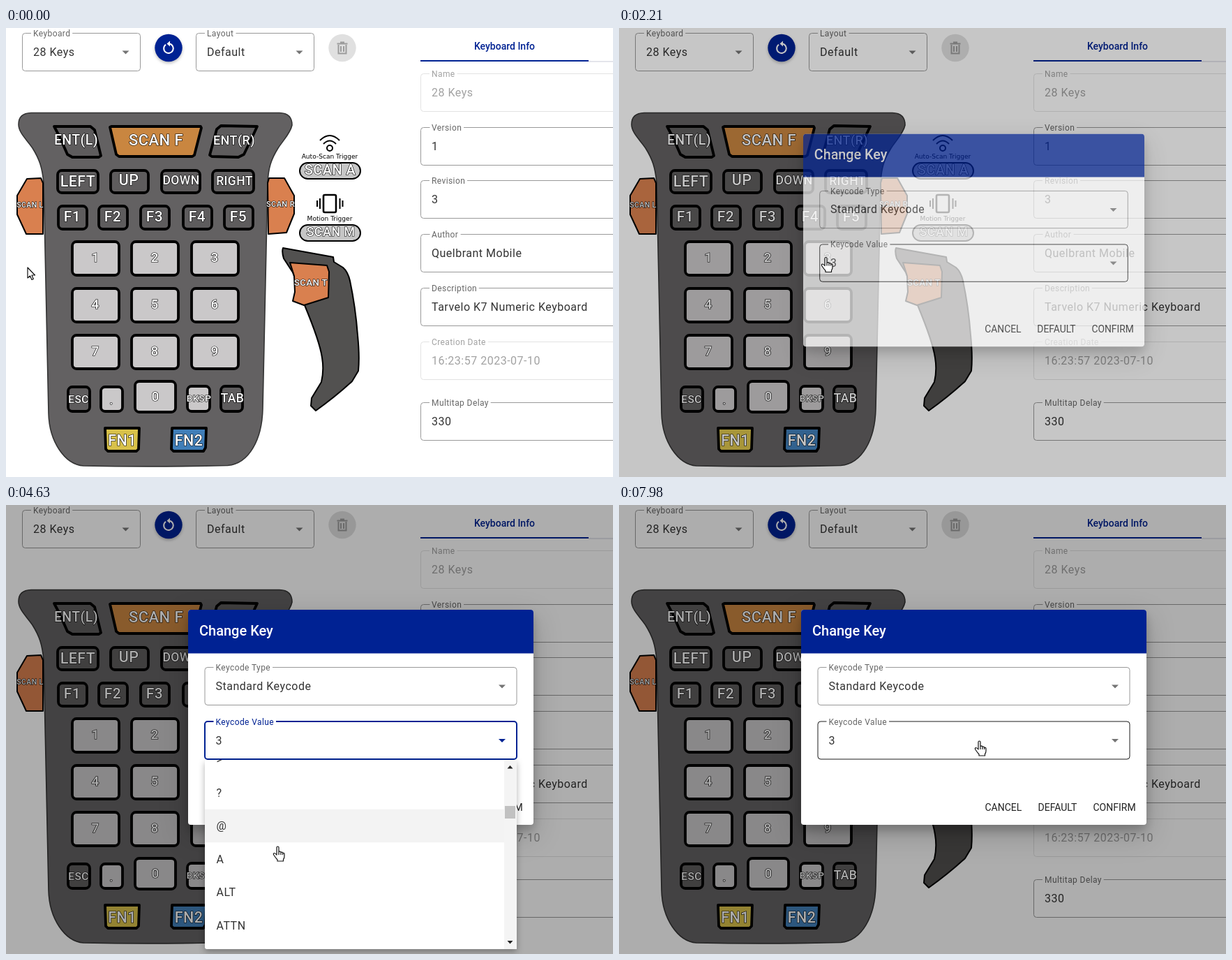
An HTML page that plays this animation: 870 by 643 pixels, repeating every 8000 ms.

```html
<!DOCTYPE html>
<html lang="en">
<head>
<meta charset="utf-8">
<title>Keyboard editor</title>
<style>
  html, body { margin: 0; width: 100%; height: 100%; overflow: hidden; background: #fff; }
  svg { display: block; font-family: Roboto, sans-serif; }
  .key { stroke: #000; stroke-width: 3.8; stroke-linejoin: round; }
  .key.hot { stroke: #fff200; }
  .cap { fill: #fff; stroke: #000; stroke-width: 1.2; paint-order: stroke; text-anchor: middle; font-weight: 500; letter-spacing: .4px; }
  .note { font: 9.07px "DejaVu Sans", sans-serif; text-anchor: middle; }
  .ink { fill: none; stroke: #000; stroke-width: 2; }
  .part { stroke: #000; stroke-width: 2; stroke-linejoin: round; }
  .field rect { fill: none; stroke: #999; }
  .label { font-size: 12px; letter-spacing: .4px; fill: #666; stroke: #fff; stroke-width: 8px; paint-order: stroke; }
  .value { font-size: 16px; letter-spacing: .5px; fill: #333; }
  .caret { fill: #757575; }
  .off rect { stroke: #e2e2e2; }
  .off .label, .off .value { fill: #a2a2a2; }
  .over rect { stroke: #1c1c1c; }
  .focus rect { stroke: #002293; stroke-width: 2; }
  .focus .label, .focus .caret { fill: #002293; }
  .button { font-size: 14px; fill: #222; }
  .tip { font-size: 12px; font-weight: 700; fill: #fff; }
  #dialog { filter: drop-shadow(0 8px 7px rgba(0, 0, 0, .2)) drop-shadow(0 12px 19px rgba(0, 0, 0, .2)); }
  #menu { filter: drop-shadow(0 4px 5px rgba(0, 0, 0, .3)); }
</style>
</head>
<body>
<svg id="stage" width="870" height="643" viewBox="0 0 870 643"></svg>
<script>
const BLUE = '#002293', DARK = '#5e5c5d', LIGHT = '#cac8c9', ORANGE = '#d9804f';
const ROW = 47.5, MENU_TOP = 365, SCROLL = 771, LOOP = 8000;

const cap = (s, x, y, size) =>
  `<text class="cap" x="${x}" y="${y + size * .355}" font-size="${size}">${s}</text>`;
const poly = (points, fill, cls = 'key') => `<polygon class="${cls}" points="${points}" fill="${fill}"/>`;
const key = (x1, y1, x2, y2, fill, id = '') =>
  `<rect class="key" id="${id}" x="${x1 + 2}" y="${y1 + 2}" width="${x2 - x1 - 4}" height="${y2 - y1 - 4}" rx="6" fill="${fill}"/>`;
const caret = (x, y) => `<path class="caret" d="M${x - 5} ${y - 2.5}h10l-5 5z"/>`;
const field = (x, y, w, label, value, cls = '', id = '') =>
  `<g class="field ${cls}" id="${id}"><rect x="${x + .5}" y="${y + .5}" width="${w}" height="54" rx="4"/>
  <text class="label" x="${x + 16}" y="${y + 5}">${label}</text>
  <text class="value" x="${x + 16}" y="${y + 33}">${value}</text>
  ${cls === 'select' ? caret(x + w - 20.5, y + 28) : ''}</g>`;

function toolbar() {
  return field(23, 7, 169, 'Keyboard', '28 Keys', 'select') +
    field(272, 7, 169, 'Layout', 'Default', 'select') +
    `<circle cx="233" cy="28.500" r="19.7" fill="${BLUE}" style="filter:drop-shadow(0 2px 2px #0004)"/>
    <path d="M229 23.7a6.8 6.8 0 1 0 5-1.2" fill="none" stroke="#fff" stroke-width="2"/>
    <path d="M235 18.5v8l-4.5-4z" fill="#fff"/>
    <circle cx="482" cy="28.5" r="19.7" fill="#e0e0e0"/>
    <path d="M476.5 24v12.5h11V24M474.5 22.5h15M479 20.5h6M480 26v8M484 26v8" fill="none" stroke="#9c9c9c" stroke-width="2"/>`;
}

function info() {
  const rows = [
    [65, 'Name', '28 Keys', 'off'], [142, 'Version', '1'], [218, 'Revision', '3'],
    [295, 'Author', 'Quelbrant Mobile'], [372, 'Description', 'Tarvelo K7 Numeric Keyboard'],
    [449, 'Creation Date', '16:23:57 2023-07-10', 'off'], [536, 'Multitap Delay', '330']];
  return `<text x="714.5" y="31" text-anchor="middle" font-size="14" font-weight="500" fill="${BLUE}">Keyboard Info</text>
    <path d="M835 48h35" stroke="#c9cad8"/><path d="M594 47h241" stroke="${BLUE}" stroke-width="2"/>` +
    rows.map(([y, label, value, cls]) => field(594, y, 300, label, value, cls)).join('');
}

function device() {
  let s = `<path d="M36 121.5H392Q410 122 410 139C408 150 398 160 390 172C380 188 376 200 375 222L368 545C367 590 348 624 318 626.500Q215 629 111 627C84 625 62 592 61 552L54 222C52 200 48 188 38 172C30 160 18 150 18 138Q18 122 36 121.5Z" fill="#636162" stroke="#333" stroke-width="1.600"/>`;
  s += poly('30,216 50,215 53,222 53,295 29,295 16,267 16,240', ORANGE, 'part');
  s += poly('377,215 399,215 413,240 413,266 402,293 376,295 375,222', ORANGE, 'part');
  s += poly('69,141 121,141 127,146 136,183 133,185 95,185 88,181 77,156', DARK);
  s += poly('360,141 308,140 302,145 292,182 295,184 333,185 341,181 353,156', DARK);
  s += poly('149,142 151,141 279,141 280,143 270,182 267,184 162,184 158,181', '#c98640');
  for (const [a, b] of [[72, 134], [148, 206], [221, 280], [294, 357]]) s += key(a, 202, b, 238, DARK);
  [73, 131, 191, 252, 311].forEach((x, i) => {
    s += key(x, 253, x + 45, 290, DARK) + cap('F' + (i + 1), x + 22, 269.5, 21);
  });
  for (let i = 0; i < 9; i++) {
    const x = [93, 178, 264][i % 3], y = 304 + 67 * Math.floor(i / 3);
    s += key(x, y, x + 71, y + 52, LIGHT, 'n' + (i + 1)) + cap(i + 1, x + 35, y + 24.5, 19);
  }
  s += key(183, 504, 245, 552, LIGHT) + key(87, 512, 122, 551, DARK) + key(134, 512, 169, 551, LIGHT) +
    key(258, 511, 294, 551, LIGHT) + key(306, 511, 341, 551, DARK) +
    poly('142,573 191,573 190,603 187,606 146,606 143,603', '#d8c14a') +
    poly('238,573 287,573 286,601 283,606 240,606 237,603', '#407eb8');
  s += `<g class="part"><rect x="421" y="193" width="87" height="23" rx="11.5" fill="#c6c6c6"/>
    <rect x="421" y="282" width="87" height="23" rx="11.5" fill="#c6c6c6"/>
    <path d="M397 315L469 328L470 335L483 343Q490 349 493 362Q501 400 504 440Q507 470 505 491L496 506Q472 528 444 548L437 541L438 530L452 507Q456 490 453 472Q450 450 428 397L411 350L398 330Q395 320 397 315Z" fill="#525150"/></g>`;
  s += poly('407,336 460,340 463,349 462,386 427,397 411,391 414,378 413,355', ORANGE, 'part');
  s += `<g class="ink"><path d="M450 161Q464 147 478 161M455 166Q464 157 473 166"/><circle cx="464" cy="172" r="4"/>
    <rect x="455" y="239" width="18" height="25" rx="2" stroke-width="2.6"/>
    <path d="M450 244v15M446 247v9M478.500 244v15M482.500 247v9"/></g>
    <text class="note" x="464" y="187">Auto-Scan Trigger</text><text class="note" x="464" y="276">Motion Trigger</text>`;
  const caps = [
    ['ENT(L)', 100.5, 160.5, 19.5], ['SCAN F', 215, 160.5, 22], ['ENT(R)', 327, 160.5, 18],
    ['LEFT', 103, 219.5, 21.5], ['UP', 176, 217.5, 21.5], ['DOWN', 251, 218, 17.5], ['RIGHT', 327.5, 219, 17.5],
    [0, 214, 527, 19], ['ESC', 104, 531, 15.5], ['.', 151, 533, 18], ['BKSP', 276.5, 530, 13.5], ['TAB', 324.5, 530, 17.5],
    ['FN1', 166.5, 590, 21.5], ['FN2', 262, 590, 21.5], ['SCAN L', 34.5, 253, 10.5], ['SCAN R', 393.5, 252.5, 11],
    ['SCAN T', 437, 364.5, 13.2], ['SCAN A', 464.5, 202.5, 20], ['SCAN M', 465.5, 292, 18]];
  return s + caps.map(c => cap(...c)).join('');
}

function dialog() {
  return `<g id="dialog"><rect x="261" y="150" width="495" height="308" rx="4" fill="#fff"/>
    <path d="M261 212.500V154q0-4 4-4H752q4 0 4 4V212.500z" fill="${BLUE}"/>
    <text x="277" y="187" font-size="20" font-weight="500" fill="#fff">Change Key</text>` +
    field(284.5, 232, 447, 'Keycode Type', 'Standard Keycode', 'select') +
    field(284.5, 309.5, 447, 'Keycode Value', '3', 'select', 'target') +
    `<text class="button" x="524.500" y="437.500">CANCEL</text><text class="button" x="600.500" y="437.500">DEFAULT</text>
    <text class="button" x="679.500" y="437.500">CONFIRM</text></g>`;
}

function menu() {
  const items = [...'./0123456789:;', '&lt;', '=', '&gt;', '?', '@', 'A', 'ALT', 'ATTN', 'B', 'BACK'];
  const rows = items.map((s, i) => `<text class="value" x="16.5" y="${10.5 + i * ROW + 5.5}">${s}</text>`).join('');
  return `<g id="menu"><rect x="285" y="365" width="447" height="271" rx="3" fill="#fff"/>
    <svg x="285" y="365" width="429" height="271"><g id="list">
      <rect id="hover" width="429" height="${ROW}" fill="#f3f3f3"/>${rows}
      <path d="M396 248l5.500 5.500l10-11" fill="none" stroke="${BLUE}" stroke-width="2"/></g></svg>
    <rect x="714" y="365" width="18" height="271" fill="#f4f4f4"/>
    <rect id="thumb" x="715" width="15" height="18" fill="#c1c1c1"/>
    <path d="M718.500 377.500h8l-4-4.500zM718.500 624h8l-4 4.500z" fill="#222"/></g>`;
}

function tooltip() {
  const lines = ['BATTSWAP &amp; PTT keycodes', 'only supported with version 2 of', 'the Advanced Keyboard.'];
  return `<g id="tooltip"><rect x="410" y="357" width="197" height="55" rx="4" fill="#616161" opacity=".9"/>` +
    lines.map((s, i) => `<text class="tip" x="417" y="${373.5 + i * 15.6}">${s}</text>`).join('') + '</g>';
}

const stage = document.getElementById('stage');
stage.innerHTML = toolbar() + info() + device() +
  '<rect id="scrim" width="870" height="643"/>' + dialog() + menu() + tooltip() +
  `<circle id="press" r="13" fill="#e2d800"/>
  <g id="cursor" fill="#fff" stroke="#111" stroke-width="1.200" stroke-linejoin="round">
    <path id="arrow" d="M0 0V15L3.500 12L6 17.500L8.300 16.500L6 11H10.500Z"/>
    <path id="hand" d="M-2 12V1.500Q-2 0-.5 0T1 1.500V7.500Q3.500 6.500 4 8.300Q6.300 7.600 6.700 9.300Q9 9 9 11V14Q9 17 7.500 18.500V21H-1V19Q-3 17-6 12.500Q-7.500 10-5.500 9.500Q-4 9.500-2 12ZM1 7.500V12M4 8.300V12M6.700 9.300V12"/>
  </g>`;

const el = {};
for (const node of stage.querySelectorAll('[id]:not([id=""])')) el[node.id] = node;
const targetValue = el.target.querySelector('.value');
const set = (node, attrs) => { for (const k in attrs) node.setAttribute(k, attrs[k]); };

// Pointer path: time, x, y
const path = [
  [0, 31, 343], [70, 31, 343], [860, 163, 338], [1670, 297, 328.5], [2780, 297, 328.5], [3340, 488, 331],
  [3790, 488, 331], [3980, 440, 430], [4560, 391, 475], [4630, 390, 489], [5040, 384, 497], [5500, 384, 497],
  [5900, 295, 324], [6200, 325, 343], [6400, 325, 343], [6770, 615, 419], [6950, 628, 444], [7600, 628, 444],
  [7980, 517, 338], [LOOP, 517, 338]];
const presses = [2000, 3550, 5350, 7020];

const ramp = (t, start, length) => Math.min(1, Math.max(0, (t - start) / length));
const smooth = p => p * p * (3 - 2 * p);
const within = (t, a, b) => t >= a && t < b;
const scrollAt = t => SCROLL * smooth(ramp(t, 3960, 580));

function cursorAt(t) {
  const i = Math.max(1, path.findIndex(p => p[0] > t));
  const [a, b] = [path[i - 1], path[i]], p = ramp(t, a[0], b[0] - a[0]);
  return [a[1] + (b[1] - a[1]) * p, a[2] + (b[2] - a[2]) * p];
}

function scaled(node, opacity, sx, sy, x, y) {
  set(node, { opacity, transform: `translate(${x} ${y}) scale(${sx} ${sy}) translate(${-x} ${-y})` });
}

function draw(t) {
  const [x, y] = cursorAt(t);
  const open = t >= 2130;

  let onKey = false;
  for (let i = 1; i <= 3; i++) {
    const left = [93, 178, 264][i - 1];
    const hot = !open && within(x, left, left + 71) && within(y, 304, 356);
    el['n' + i].classList.toggle('hot', hot);
    onKey = onKey || hot;
  }

  const shown = ramp(t, 2130, 115);
  set(el.scrim, { opacity: .32 * shown });
  const size = 1 - .2 * (1 - shown) ** 2.3;
  scaled(el.dialog, shown, size, size, 508.5, 304);

  const focus = within(t, 3550, 7040), picked = within(t, 5400, 7040);
  el.target.classList.toggle('focus', focus);
  el.target.classList.toggle('over', !focus && within(x, 285, 732) && within(y, 310, 365));
  targetValue.textContent = picked ? 'A' : '3';
  targetValue.style.fill = picked ? '#2f3f80' : '';

  const unfold = ramp(t, 3702, 120), scroll = scrollAt(t);
  scaled(el.menu, unfold * (1 - ramp(t, 5420, 110)), 1, .8 + .2 * unfold, 508, MENU_TOP);
  set(el.list, { transform: `translate(0 ${-scroll})` });
  set(el.thumb, { y: 405 + 26 * scroll / SCROLL });
  // The highlighted row trails the pointer slightly.
  const past = t - 70, pointerY = cursorAt(past)[1];
  const row = Math.floor((pointerY - MENU_TOP + scrollAt(past) - 10.5) / ROW + .5);
  set(el.hover, { y: 10.5 + (row - .5) * ROW, opacity: pointerY > MENU_TOP ? 1 : 0 });

  const first = t < 5000;
  const tipIn = ramp(t, first ? 3160 : 6256, 150), tipOut = ramp(t, first ? 3830 : 6470, 80);
  const tipSize = .8 + .2 * tipIn;
  scaled(el.tooltip, Math.min(1, tipIn * 1.15) * (1 - tipOut), tipSize, tipSize, 508.5, 357);

  const pressed = presses.some(p => within(t, p, p + 130));
  set(el.press, { cx: x, cy: y, opacity: pressed ? .65 : 0 });
  set(el.cursor, { transform: `translate(${x} ${y})` });
  const hand = onKey || open;
  el.hand.style.display = hand ? '' : 'none';
  el.arrow.style.display = hand ? 'none' : '';
}

function tick() {
  draw(performance.now() % LOOP);
  requestAnimationFrame(tick);
}
tick();
</script>
</body>
</html>
```
